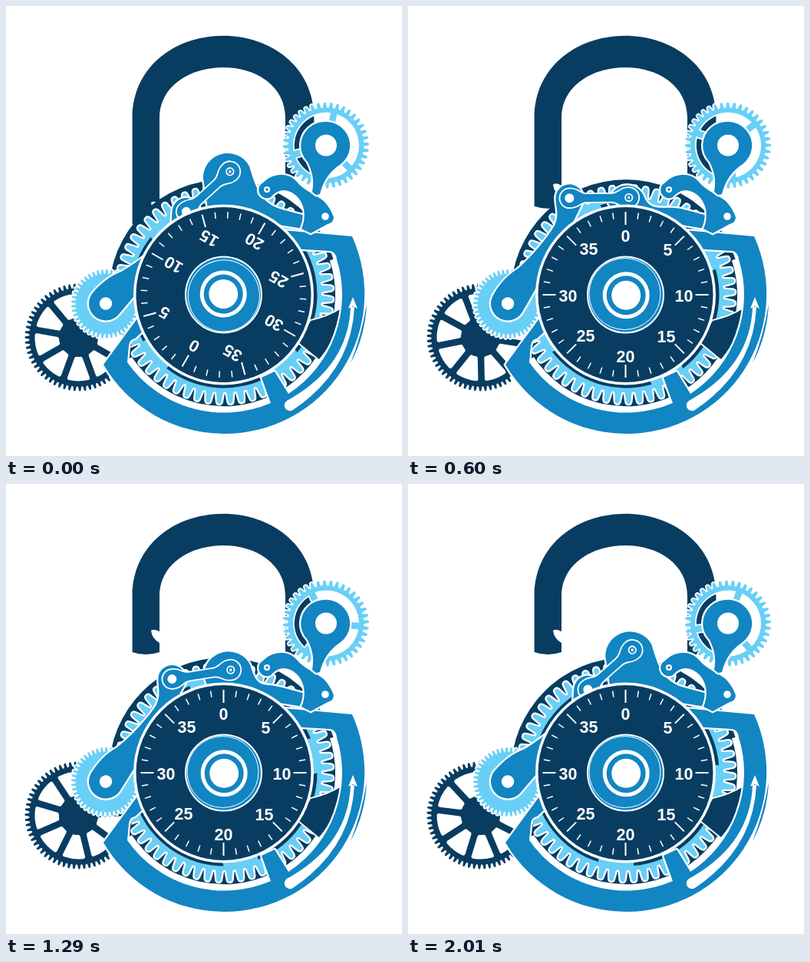
Write an HTML page that moves like this. It is 516x586 px and loops after 2.04 s.

```html
<!DOCTYPE html>
<html lang="en">
<head>
<meta charset="utf-8">
<title>Clockwork padlock</title>
<style>
  html, body { margin: 0; width: 516px; height: 586px; overflow: hidden; background: #fff; }
  svg { display: block; }
  .navy { fill: #083d61; }
  .blue { fill: #1285c3; }
  .light { fill: #69cff6; }
  .white { fill: #fff; }
  .edge { stroke: #fff; stroke-width: 4.6; stroke-linejoin: round; paint-order: stroke; }
  .fine { stroke-width: 3.6; }
  .soft { fill: #fff; stroke: #fff; stroke-width: 5; stroke-linejoin: round; }
  text { font: 700 21.5px "Liberation Sans", Arial, sans-serif; text-anchor: middle; fill: #fff; }
</style>
</head>
<body>
<svg id="stage" width="516" height="586" viewBox="0 0 516 586"></svg>
<script>
const LOOP = 2040, STEP = 30;
const CENTER = [283.5, 376], LEVER_PIVOT = [130, 387.5], LEVER = 159, LINK = 77.4;
const rad = deg => deg * Math.PI / 180;
const polar = (r, deg) => [r * Math.sin(rad(deg)), -r * Math.cos(rad(deg))];
const stage = document.getElementById('stage');

function add(tag, attrs, parent = stage) {
  const el = document.createElementNS('http://www.w3.org/2000/svg', tag);
  for (const key in attrs) el.setAttribute(key, attrs[key]);
  parent.appendChild(el);
  return el;
}
const shape = (cls, d, parent) => add('path', { class: cls, d, 'fill-rule': 'evenodd' }, parent);
const disc = (cls, cx, cy, r, parent) => add('circle', { class: cls, cx, cy, r }, parent);
const group = () => add('g', {});
const place = (el, [x, y], deg) => el.setAttribute('transform', `translate(${x} ${y}) rotate(${deg})`);

// Outline of a wheel with rounded teeth between two radii.
function teeth(count, root, tip) {
  const samples = count * 16, points = [];
  for (let i = 0; i < samples; i++) {
    const wave = Math.tanh(2.4 * Math.sin(i / 16 * 2 * Math.PI)) / Math.tanh(2.4);
    const r = (root + tip) / 2 + wave * (tip - root) / 2;
    points.push(polar(r, i / samples * 360).map(v => v.toFixed(2)).join(' '));
  }
  return `M${points.join('L')}Z`;
}

// Openings between the spokes, with parallel spoke edges.
function windows(count, inner, outer, spoke) {
  let d = '';
  for (let i = 0; i < count; i++) {
    const from = i * 360 / count, to = from + 360 / count;
    const gap = r => Math.asin(spoke / 2 / r) * 180 / Math.PI;
    const a = polar(inner, from + gap(inner)), b = polar(outer, from + gap(outer));
    const c = polar(outer, to - gap(outer)), e = polar(inner, to - gap(inner));
    d += `M${a}L${b}A${outer} ${outer} 0 0 1 ${c}L${e}A${inner} ${inner} 0 0 0 ${a}Z`;
  }
  return d;
}

// Two round heads joined by a slimmer bar along the x axis.
function bone(length, ra, rb, w) {
  const a = ra * 1.05, b = length - rb;
  return `M0 ${-ra}A${ra} ${ra} 0 0 0 0 ${ra}C${a} ${ra} ${a} ${w} ${a * 1.9} ${w}` +
    `L${length - rb * 1.9} ${w}C${b} ${w} ${b} ${rb} ${length} ${rb}A${rb} ${rb} 0 0 0 ${length} ${-rb}` +
    `C${b} ${-rb} ${b} ${-w} ${length - rb * 1.9} ${-w}L${a * 1.9} ${-w}C${a} ${-w} ${a} ${-ra} 0 ${-ra}Z`;
}

const shackle = shape('navy', '');
disc('navy', 284, 376, 150);

const mainGear = group();
shape('light edge', teeth(60, 127, 142), mainGear);
shape('navy', windows(4, 114, 121.5, 46), mainGear);

// Pale rim between the main gear and the case.
const rim = add('path', { d: 'M160 459.6A149.5 149.5 0 0 0 426.2 329.8', fill: 'none', stroke: '#fff' });
rim.setAttribute('stroke-width', 9);

const spokedGear = group();
shape('navy', teeth(63, 64, 70), spokedGear);
shape('soft', windows(9, 28, 54.5, 13.5), spokedGear);

shape('navy edge fine', 'M397 410Q420 405 437 394Q433 430 408 460L381 438Z');

const smallGear = group();
shape('light edge fine', teeth(45, 39, 45), smallGear);

shape('blue edge', 'M127 467A182 182 0 0 0 284 557A182 182 0 0 0 451 300L350 291L372 316L422 319Q430 320 431 330' +
  'A154 154 0 0 1 368 505L350 476L333 484L345 517A154 154 0 0 1 158 464L160 442Q161 434 168 433L178 424L171 407Z');
shape('white', 'M449 392Q446 470 366 514A7 7 0 0 0 374 526Q450 475 454 392Z');
shape('white', 'M452 379L458 394L452 391L446 394Z');
shape('blue', 'M470 388Q468 430 449 465Q463 430 470 388Z');

// The arm bends towards the dial between its two heads.
const lever = group();
shape('blue edge', 'M0 -22A22 22 0 0 0 0 22C40 22 60 20 92 21C120 22 140 19 159 18A18 18 0 1 0 152 -16.6' +
  'C142 -12 136 -1 120 1C100 2 60 -6 45 -12C30 -20 15 -22 0 -22Z', lever);
disc('white', 0, 0, 8.2, lever);

const rocker = shape('blue edge', '');

const link = group();
shape('blue edge fine', bone(LINK, 12, 12.5, 5), link);
disc('white', 0, 0, 6, link);
disc('white', LINK, 0, 5.6, link);
disc('blue', LINK, 0, 3.8, link);
disc('white', LINK, 0, 1.8, link);

shape('blue edge', 'M345 249A10.5 10.5 0 1 1 335 230C348 217 368 216 379 229C388 240 404 246 414 254' +
  'C420 260 424 267 427 275Q427 282 419 284L397 296L385 290C389 281 390 270 387 261' +
  'C383 247 368 237 356 241Q350 243 345 249Z');
disc('white', 340, 239, 4);
disc('blue', 340, 239, 1.8);
disc('white', 416, 274, 4.8);

const upperGear = group();
shape('light edge fine', teeth(40, 49, 56) + windows(3, 30, 43, 8.5), upperGear);
shape('blue edge', 'M404 246L399 242C402 226 399 215 393 203A32 31 0 1 1 436 206C422 215 413 228 409 245Z');
disc('white', 417, 181.5, 14);

disc('white', ...CENTER, 117.5);
const dial = group();
disc('navy', 0, 0, 114, dial);
for (let i = 0; i < 40; i++) {
  const major = i % 5 === 0;
  const [x1, y1] = polar(108, i * 9), [x2, y2] = polar(major ? 91 : 99.5, i * 9);
  add('line', { x1, y1, x2, y2, stroke: '#fff', 'stroke-width': major ? 2 : 1.5 }, dial);
}
const labels = [[0, -77], [55, -59], [76, 1], [53, 54], [0, 80], [-52, 53], [-75, 1], [-48, -60]];
labels.forEach(([x, y], i) => {
  add('text', { x, y: y + 7.5 }, dial).textContent = i * 5;
});
disc('white', 0, 0, 50.5, dial);
disc('blue', 0, 0, 48.5, dial);
add('circle', { cx: -1, cy: -1, r: 46.5, fill: 'none', stroke: '#fff', 'stroke-width': 1 }, dial);
disc('white', 0.7, 0.7, 30.5, dial);
disc('blue', 0.7, 0.7, 25.5, dial);
disc('white', 0.7, 0.7, 19, dial);

const swing = [[0, 48.8], [100, 48.4], [390, 54.8], [810, 63.4], [1050, 62.1], [1290, 57.1], [1560, 51.9]];

// Periodic cubic curve through the swing keys.
function leverAngle(t) {
  const n = swing.length;
  const key = i => {
    const [time, value] = swing[(i + n) % n];
    return [time + Math.floor(i / n) * LOOP, value];
  };
  const slope = i => (key(i + 1)[1] - key(i - 1)[1]) / (key(i + 1)[0] - key(i - 1)[0]);
  let i = n - 1;
  while (swing[i][0] > t) i--;
  const [t0, a] = key(i), [t1, b] = key(i + 1);
  const h = t1 - t0, u = (t - t0) / h, v = 1 - u;
  return v * v * (1 + 2 * u) * a + u * u * (3 - 2 * u) * b + h * u * v * (v * slope(i) - u * slope(i + 1));
}

function ease(t, start, end) {
  const u = Math.min(1, Math.max(0, (t - start) / (end - start)));
  return (1 - Math.cos(Math.PI * u)) / 2;
}

function drawShackle(drop) {
  const y = v => v + drop;
  shackle.setAttribute('d', `M164.6 ${y(219)}V146C164.6 78 222 38.7 283 38.7C344 38.7 401.4 78 401.4 146V222H364V146` +
    `C364 104 326 80 283 80C240 80 200 104 200 146V${y(192)}Q192 ${y(188)} 189 ${y(191)}` +
    `Q190 ${y(201)} 200 ${y(207)}V${y(219)}Q182 ${y(225)} 164.6 ${y(219)}Z`);
}

function drawLinkage(angle) {
  const u = angle - 48.8;
  const tilt = -42.4 + 4.16 * u - 0.0726 * u * (u - 6.7);
  const joint = [LEVER_PIVOT[0] + LEVER * Math.cos(rad(angle)), LEVER_PIVOT[1] - LEVER * Math.sin(rad(angle))];
  const x = joint[0] + LINK * Math.cos(rad(tilt)), y = joint[1] + LINK * Math.sin(rad(tilt));
  place(lever, LEVER_PIVOT, -angle);
  place(link, joint, tilt);
  const r = 32 - Math.max(0, y - 243) * 1.2;
  const cx = x - 3 * r / 32, cy = y + 8;
  rocker.setAttribute('d', `M${cx - r} ${cy}A${r} ${r} 0 0 1 ${cx + r * 0.88} ${cy - r * 0.47}` +
    `C${cx + r + 6} ${cy + r * 0.6} 335 258 360 265L390 273L393 291L350 284L284 285L${cx - r + 7} 270Z`);
}

function draw(t) {
  const turn = t / LOOP;
  drawShackle(65 * (1 - ease(t, 420, 860)));
  drawLinkage(leverAngle(t));
  place(mainGear, [284, 376], 49 + 48 * turn);
  place(spokedGear, [94.5, 431.5], 200 * turn);
  place(smallGear, [130, 388], -280 * turn);
  place(upperGear, [417, 181.5], 14 + 127.5 * turn);
  place(dial, CENTER, -150 * (1 - ease(t, 0, 370)));
}

const start = performance.now();
function tick() {
  const t = (performance.now() - start) % LOOP;
  draw(Math.floor(t / STEP) * STEP);
  requestAnimationFrame(tick);
}
draw(0);
requestAnimationFrame(tick);
</script>
</body>
</html>
```
